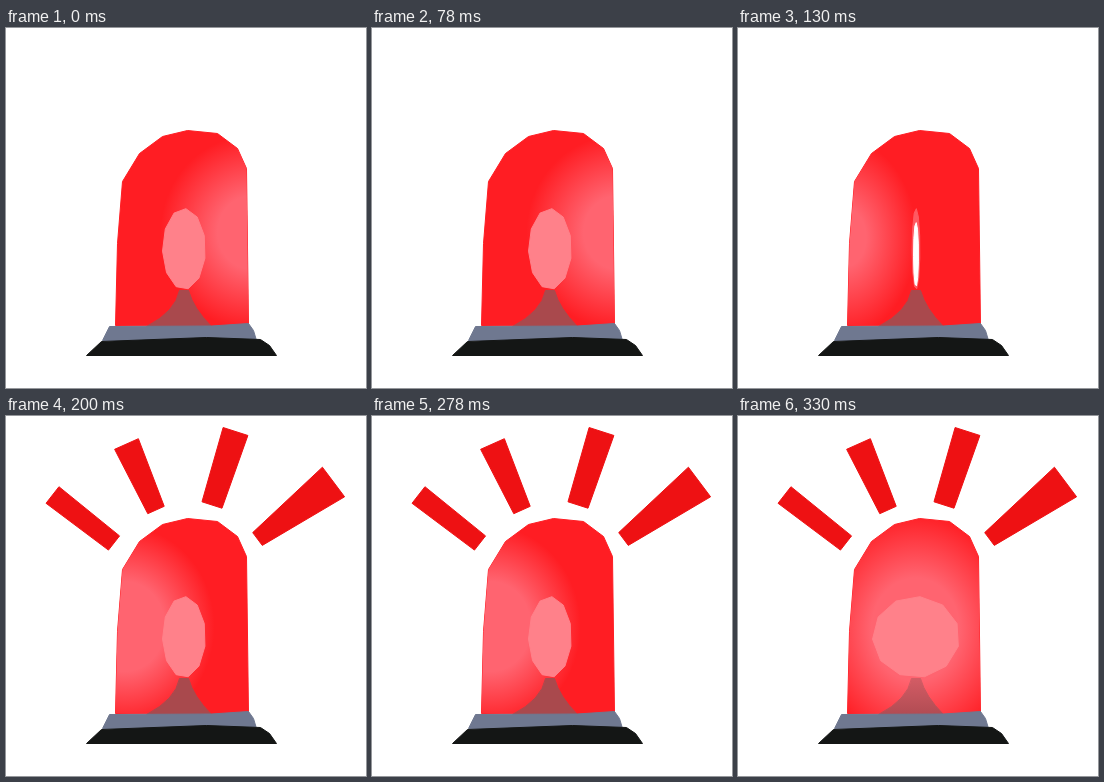
These frames come from a looping animation (360x360 px, 0.4 s). An HTML page with a canvas:

```html
<!DOCTYPE html>
<html lang="en">
<head>
<meta charset="utf-8">
<title>Siren light</title>
<style>
  html, body { margin: 0; width: 100%; height: 100%; overflow: hidden; background: #fff; }
  canvas { display: block; width: 360px; height: 360px; }
</style>
</head>
<body>
<canvas id="stage"></canvas>
<script>
const canvas = document.getElementById('stage');
const ctx = canvas.getContext('2d');
const ratio = window.devicePixelRatio || 1;
canvas.width = canvas.height = 360 * ratio;
ctx.scale(ratio, ratio);
ctx.lineJoin = 'round';

const LOOP = 400;
const BULB = { x: 177.5, y: 220.5, r: 41, wide: 44 };

// The lamp turns: `face` is how much of the bulb's width is visible.
const poses = [
  { end: 130, face: 0.5, glow: { x: 246, y: 204, rx: 92, ry: 97, core: 0.38 } },
  { end: 200, face: 0.1, glow: { x: 106, y: 209, rx: 72, ry: 98, core: 0.3 } },
  { end: 330, face: 0.5, glow: { x: 118, y: 210, rx: 90, ry: 100, core: 0.45 }, rays: true },
  { end: 400, face: 1, glow: { x: 177, y: 213, rx: 100, ry: 117, core: 0.44 }, rays: true }
];

const shape = (...points) => {
  const path = new Path2D();
  points.forEach(([x, y]) => path.lineTo(x, y));
  path.closePath();
  return path;
};

// A tapered bar between two midpoints, with a width at each end.
function bar(x1, y1, w1, x2, y2, w2) {
  const length = Math.hypot(x2 - x1, y2 - y1);
  const nx = (y2 - y1) / length / 2, ny = (x1 - x2) / length / 2;
  return shape(
    [x1 - nx * w1, y1 - ny * w1], [x1 + nx * w1, y1 + ny * w1],
    [x2 + nx * w2, y2 + ny * w2], [x2 - nx * w2, y2 - ny * w2]);
}

function facetedOval(x, y, rx, ry, sides = 11) {
  const points = Array.from({ length: sides }, (_, i) => {
    const a = 0.09 + i * 2 * Math.PI / sides;
    return [x + rx * Math.sin(a), y - ry * Math.cos(a)];
  });
  return shape(...points);
}

const dome = shape([109, 297], [111, 215], [116, 153], [133, 125], [156, 108],
  [181, 102], [211, 105], [231, 120], [240, 140], [242, 298]);
const collar = shape([103, 298], [205, 297.5], [242, 295], [247, 302], [250, 312], [96, 312]);
const foot = shape([80, 327], [95, 313], [200, 309], [254, 311], [263, 317], [270, 327]);
const stem = new Path2D('M140 298Q169 283 173 262H182Q187 280 205 298Z');
const rays = [
  bar(46, 78.5, 21, 107.5, 126.5, 18),
  bar(120, 27.5, 26, 149.5, 93.5, 18),
  bar(229, 15, 26, 205.5, 88.5, 21),
  bar(327, 65.5, 37, 251, 122.5, 16)
];

// The thin outline covers the border pixels of each shape.
function paint(path, color) {
  ctx.fillStyle = ctx.strokeStyle = color;
  ctx.fill(path);
  ctx.stroke(path);
}

function drawGlow({ x, y, rx, ry, core }) {
  const fade = ctx.createRadialGradient(0, 0, core, 0, 0, 1);
  fade.addColorStop(0, 'rgba(255,100,112,1)');
  fade.addColorStop(1, 'rgba(255,100,112,0)');
  ctx.save();
  ctx.clip(dome);
  ctx.translate(x, y);
  ctx.scale(rx, ry);
  ctx.fillStyle = fade;
  ctx.fillRect(-1, -1, 2, 2);
  ctx.restore();
}

function stemColor(face) {
  const shade = ctx.createLinearGradient(0, 262, 0, 298);
  shade.addColorStop(0, face === 1 ? '#d35c65' : '#a9494d');
  shade.addColorStop(1, face === 1 ? '#b14c53' : '#a9494d');
  return shade;
}

function drawBulb(face) {
  const { x, y, r, wide } = BULB;
  const edgeOn = face < 0.2;
  paint(facetedOval(x, y, wide * face - 0.5, r - 0.5), edgeOn ? '#ff5a62' : '#ff818a');
  if (edgeOn) paint(facetedOval(x, y + 5.5, 2.5, r - 9), '#fff');
}

function draw(time) {
  const { face, glow, rays: lit } = poses.find(p => time % LOOP < p.end);
  ctx.fillStyle = '#fff';
  ctx.fillRect(0, 0, 360, 360);
  ctx.save();
  ctx.translate(0.5, 0.5);
  if (lit) rays.forEach(ray => paint(ray, '#ee1113'));
  paint(dome, '#ff1d23');
  drawGlow(glow);
  paint(stem, stemColor(face));
  drawBulb(face);
  paint(collar, '#6f7890');
  paint(foot, '#141615');
  ctx.restore();
}

let start;
function tick(now) {
  start ??= now;
  draw(now - start);
  requestAnimationFrame(tick);
}
draw(0);
requestAnimationFrame(tick);
</script>
</body>
</html>
```
